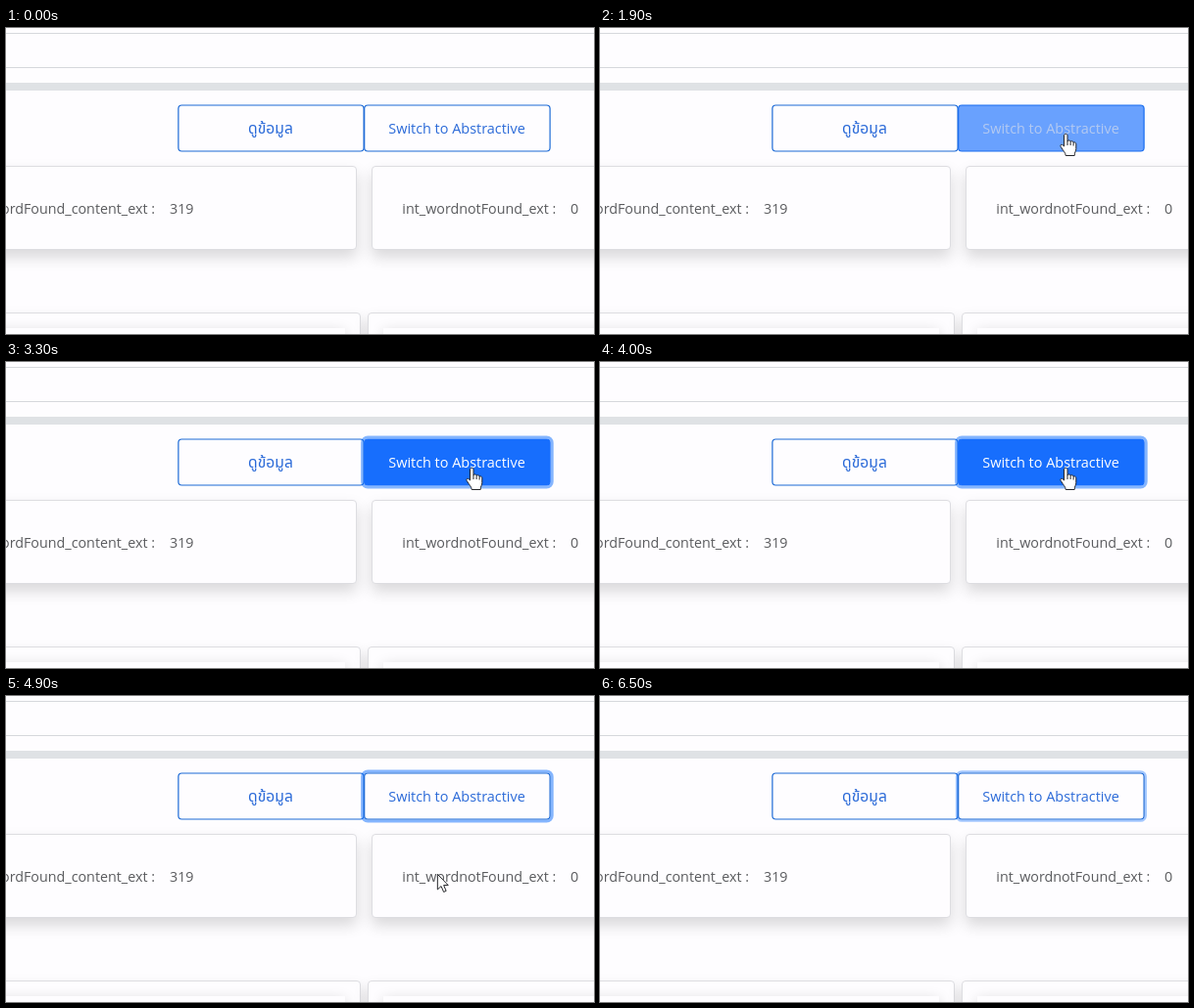
An HTML page that plays this animation: 600 by 313 pixels, repeating every 6.6 s.

```html
<!DOCTYPE html>
<html lang="en">
<head>
<meta charset="utf-8">
<title>Switch button</title>
<style>
  html, body { margin: 0; width: 100%; height: 100%; overflow: hidden; background: #fefdff; }
  #stage { position: absolute; left: 0; top: 0; width: 600px; height: 313px; overflow: hidden; }
  #stage > * { position: absolute; box-sizing: border-box; }
  .field { left: -10px; top: 5px; width: 620px; height: 36px; border: 1px solid #d6d8dc; }
  .band { left: 0; top: 56px; width: 600px; height: 8px; background: #dfe2e5; }
  .card { width: 400px; height: 86px; background: #fefdff; border: 1px solid #dddde1; border-radius: 4px; box-shadow: 0 7.5px 15px rgba(0, 0, 0, .15); }
  .upper { top: 141px; }
  .lower { top: 291px; }
  .panel { top: 307px; border: 0; border-radius: 0; box-shadow: 0 3px 13px rgba(0, 0, 0, .15); }
  svg { left: 0; top: 0; }
  .btn { fill: none; stroke: #1c6ad6; stroke-width: 1.2; }
  text { font-family: "Open Sans", "Noto Sans", sans-serif; font-size: 14.3px; fill: #5a5b5e; }
  .label { font-size: 14.45px; fill: #2b6ad8; text-anchor: middle; }
  .thai { font-family: "Noto Sans Thai Looped", "Loma", "Noto Sans Thai", "Noto Sans", sans-serif; font-size: 15.7px; }
</style>
</head>
<body>
<div id="stage">
  <div class="field"></div>
  <div class="band"></div>
  <div class="card upper" style="right:242px"></div>
  <div class="card upper" style="left:373px"></div>
  <div class="card lower" style="right:238px"></div>
  <div class="card lower" style="left:369px"></div>
  <div class="card panel" style="right:254px"></div>
  <div class="card panel" style="left:385px"></div>
  <svg width="600" height="313" viewBox="0 0 600 313">
    <rect class="btn" x="175.9" y="79" width="189.2" height="47" rx="3.5"/>
    <rect id="ring" fill="none" stroke="#0d6efd" stroke-opacity=".5"/>
    <rect class="btn" id="switch" x="365.7" y="79" width="189.4" height="47" rx="3.5"/>
    <text class="label thai" x="270" y="108">ดูข้อมูล</text>
    <text class="label" id="caption" x="460" y="108">Switch to Abstractive</text>
    <text x="152" y="190" text-anchor="end">int_wordFound_content_ext :</text>
    <text x="167" y="190">319</text>
    <text x="404.3" y="190">int_wordnotFound_ext :</text>
    <text x="576" y="190">0</text>
    <g id="cursor" fill="#fff" stroke="#25262a" stroke-linejoin="round">
      <path id="arrow" d="M.5 .5V16.2L4.2 12.8 6.8 18.7 9.3 17.6 6.8 11.8H11.4Z"/>
      <g id="hand">
        <path d="M-1.5 2C-1.5-.2 2 -.2 2 2V8C2.4 6.4 5 6.6 5.1 8.4 5.8 7.2 8 7.6 8.1 9.3 9 8.4 10.8 9 10.8 10.8V15.5C10.8 18 9.2 19 9.2 22.5H.2C.2 19.8-2.3 17.8-4.8 13.4-5.9 11.4-3.8 10.2-1.5 13Z"/>
        <path d="M2 8V12M5.1 8.5V12M8.1 9.3V12.5" fill="none"/>
      </g>
    </g>
  </svg>
</div>
<script>
  const LOOP = 6600, STEP = 100, FADE = 150;
  const byId = id => document.getElementById(id);
  const [button, ring, caption, cursor, arrow, hand] =
    ["switch", "ring", "caption", "cursor", "arrow", "hand"].map(byId);

  const linear = p => p;
  const easeOut = p => p * (2 - p);
  const slowDown = p => p * (1.5 - .5 * p);
  const progress = (t, from, to) => Math.min(1, Math.max(0, (t - from) / (to - from)));

  // Pointer moves, each starting where the last one ended
  const entry = { x: 264, y: 322 };
  const moves = [
    { from: 400, to: 700, x: 288, y: 289, ease: slowDown },
    { from: 800, to: 1100, x: 292.4, y: 276.6, ease: linear },
    { from: 1100, to: 1900, x: 475, y: 108, ease: slowDown },
    { from: 4500, to: 4700, x: 467.5, y: 144, ease: linear },
    { from: 4700, to: 5600, x: 343, y: 314, ease: linear }
  ];

  function pointer(t) {
    let { x, y } = entry;
    for (const m of moves) {
      const p = m.ease(progress(t, m.from, m.to));
      x += (m.x - x) * p;
      y += (m.y - y) * p;
    }
    return { x, y };
  }

  const fade = (t, on, off) =>
    easeOut(progress(t, on, on + FADE)) - easeOut(progress(t, off, off + FADE));

  const mix = (a, b, p) => `rgb(${a.map((v, i) => Math.round(v + (b[i] - v) * p))})`;

  function drawRing(size) {
    const gap = .6 + 1.5 * size;
    const box = { x: 365.7 - gap, y: 79 - gap, width: 189.4 + 2 * gap, height: 47 + 2 * gap, rx: 3.5 + gap };
    for (const key in box) ring.setAttribute(key, box[key]);
    ring.style.strokeWidth = 3 * size;
    ring.style.opacity = size;
  }

  function draw(now) {
    const t = Math.floor((now % LOOP) / STEP) * STEP;
    const { x, y } = pointer(t);
    const fill = fade(t, 1840, 4695);
    const pointing = t >= 1800 && t < 4600;
    button.style.fill = `rgba(23,110,253,${fill})`;
    button.style.stroke = mix([28, 106, 214], [23, 110, 253], fill);
    caption.style.fill = mix([43, 106, 216], [255, 255, 255], fill);
    drawRing(fade(t, 2140, 6480));
    cursor.setAttribute("transform", `translate(${x} ${y})`);
    arrow.style.display = pointing ? "none" : "";
    hand.style.display = pointing ? "" : "none";
  }

  const start = performance.now();
  function tick() {
    draw(performance.now() - start);
    requestAnimationFrame(tick);
  }
  tick();
</script>
</body>
</html>
```
